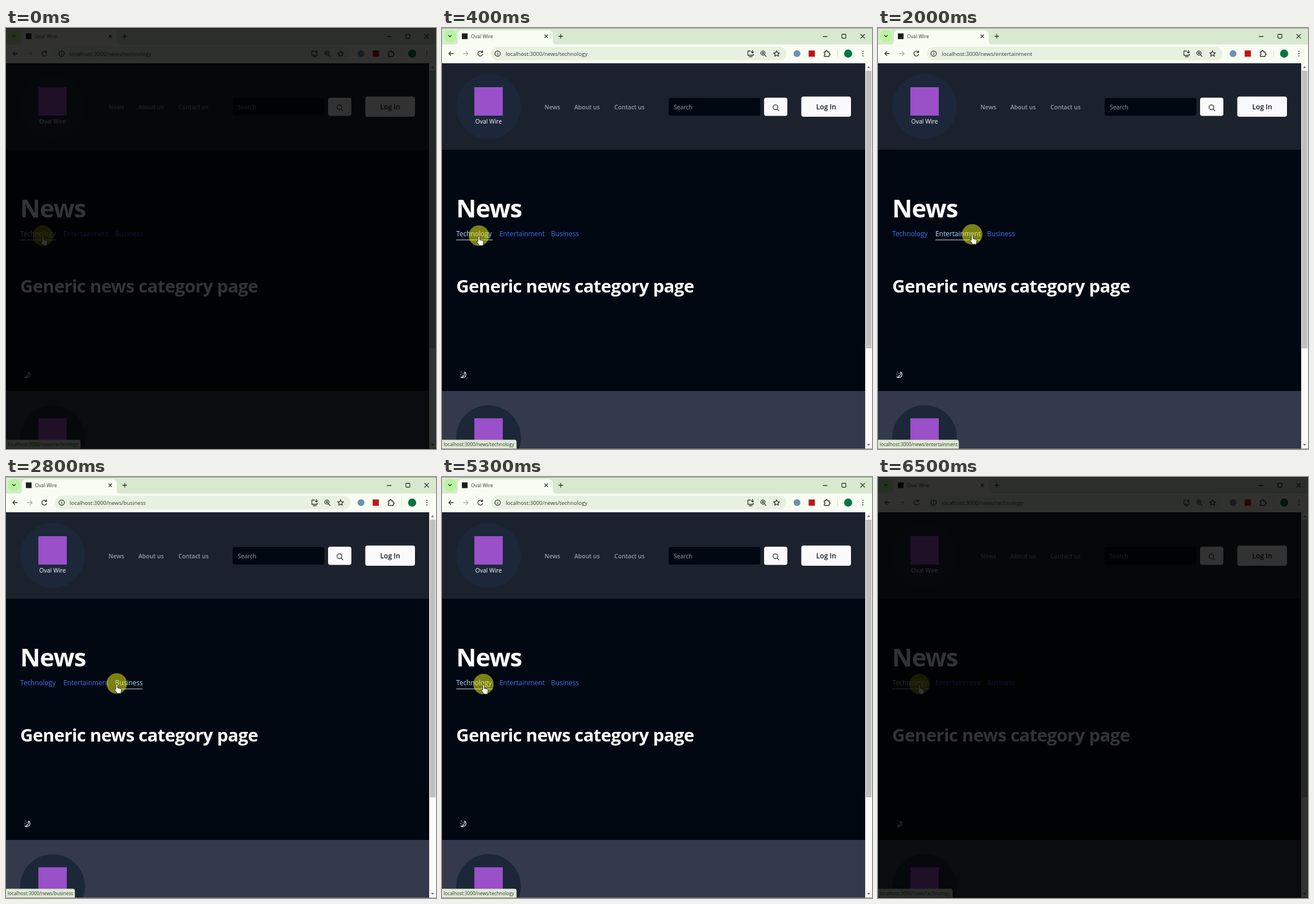
These frames come from a looping animation (757 px wide and 740 px high, 6600 ms). An HTML page:

```html
<!DOCTYPE html>
<html lang="en">
<head>
<meta charset="utf-8">
<title>News categories</title>
<style>
html, body { margin: 0; width: 100%; height: 100%; overflow: hidden; background: #000; }
svg { display: block; width: 757px; height: 740px; }
text { font-family: "Open Sans", "Noto Sans", sans-serif; white-space: pre; }
.ui { fill: #333a30; }
.ink { fill: none; stroke: #30362e; stroke-width: 1.3; stroke-linecap: round; stroke-linejoin: round; }
.head { fill: #fff; font-weight: 700; letter-spacing: -.02em; }
.nav { fill: #929cac; font-weight: 600; font-size: 10.4px; }
.link { fill: #3f72f2; font-size: 11.9px; }
.link.on { fill: #b5dcff; }
</style>
</head>
<body>
<svg viewBox="0 0 757 740">
  <defs>
    <g id="badge">
      <circle r="57" fill="#1c273a"/>
      <rect x="-25" y="-34" width="50" height="50" fill="#9a50c8"/>
      <text y="29.5" text-anchor="middle" font-size="10.5" fill="#fff">Oval Wire</text>
    </g>
  </defs>

  <!-- browser tabs -->
  <rect width="757" height="40" fill="#d9e9cf"/>
  <path d="M0 .5H757" stroke="#8d9a86"/>
  <rect x="4" y="4" width="21" height="21" rx="7" fill="#b9f3a2"/>
  <path d="M20 30q8 0 8-8V12q0-8 8-8H187q8 0 8 8v10q0 8 8 8z" fill="#f8fcf3"/>
  <rect x="35" y="9.500" width="10" height="10" fill="#1c1e1b"/>
  <text id="title" class="ui" x="51" y="18" font-size="8.700">Oval Wire</text>
  <path class="ink" d="M11.500 13l2.500 2.500 2.500-2.500M181 12l5 5m0-5l-5 5M205.500 14.500h7M209 11v7M671 15h7M737 11l7 7m0-7l-7 7"/>
  <rect class="ink" x="704" y="11" width="7" height="7" rx="1.500"/>

  <!-- toolbar -->
  <rect y="29" width="757" height="34" fill="#f8fcf3"/>
  <rect x="86" y="33" width="520" height="24" rx="12" fill="#e8f1e1"/>
  <path class="ink" d="M20 45h-8m3.500-3.500L12 45l3.500 3.500M71 42.500a4.300 4.300 0 1 0 .5 4M71.500 40v3h-3"/>
  <path class="ink" d="M38 45h8m-3.500-3.500L46 45l-3.500 3.500" style="stroke:#a9b2a3"/>
  <circle class="ink" cx="98" cy="45" r="4.700"/>
  <path class="ink" d="M98 44.700v2.500M98 42.600v.1"/>
  <text id="url" class="ui" x="112" y="48.700" font-size="9.600"></text>
  <path class="ink" d="M543 40.500h-4.500v7.500h9.500v-2M541 50.500h5M546.500 39.500v4m-2-1.500l2 2 2-2"/>
  <path class="ink" d="M567.500 47l3 3M563.500 44h3M565 42.500v3"/>
  <circle class="ink" cx="565" cy="44" r="3.700"/>
  <path class="ink" d="M589 40l1.500 3.300 3.600.4-2.700 2.400.8 3.600-3.200-1.900-3.200 1.900.8-3.600-2.700-2.400 3.600-.4z"/>
  <circle cx="625" cy="45" r="6" fill="#6f8fae"/>
  <rect x="645.500" y="39.500" width="11" height="11" fill="#bd1515"/>
  <path class="ink" d="M673 42h2.500q0-2.500 1.500-2.500t1.500 2.500h3v3q2 0 2 1.300t-2 1.400V50H673v-2.500q1.500-.3 1.500-1.500T673 44.500z"/>
  <path d="M696.500 39v12" stroke="#cfe3c2"/>
  <circle cx="715" cy="45" r="7.200" fill="#087443"/>
  <path class="ink" d="M741 41v.1M741 45v.1M741 49v.1" style="stroke-width:2"/>

  <!-- page -->
  <rect y="62" width="745" height="678" fill="#010812"/>
  <rect y="62" width="745" height="152" fill="#1b222d"/>
  <rect y="638" width="745" height="102" fill="#343a4c"/>
  <use href="#badge" x="82" y="138"/>
  <use href="#badge" x="82" y="720"/>
  <g class="nav">
    <text x="180.500" y="143">News</text>
    <text x="233" y="143">About us</text>
    <text x="303.500" y="143">Contact us</text>
  </g>
  <rect x="399" y="123" width="161.500" height="31" rx="4" fill="#010812"/>
  <text x="408" y="142.800" font-size="10.400" fill="#98a2b2">Search</text>
  <rect x="567" y="122.500" width="41" height="32" rx="4" fill="#fafafc"/>
  <path class="ink" d="M590 142.500l3 3"/>
  <circle class="ink" cx="587" cy="139.300" r="4.200"/>
  <rect x="632.500" y="120.500" width="87.500" height="35.500" rx="4" fill="#fafafc"/>
  <text x="676.300" y="143" text-anchor="middle" font-size="12" font-weight="600" fill="#10141f">Log In</text>
  <text class="head" x="25" y="332.500" font-size="43.500">News</text>
  <text class="head" x="25" y="465" font-size="31.200">Generic news category page</text>
  <g id="links"></g>
  <path id="line" stroke="#b5dcff"/>
  <path d="M40 604.800a5.200 5.200 0 1 1-6.500 8.700q6 .5 6.500-8.700z" fill="none" stroke="#e8edf5" stroke-width="1.200"/>
  <path d="M34 604.500v.1M37 607v.1M33 609.500v.1M36 610.500v.1" stroke="#e8edf5" stroke-width="1.400" stroke-linecap="round"/>

  <!-- scrollbar -->
  <rect x="745" y="62" width="12" height="678" fill="#fafbf9"/>
  <rect x="746" y="75" width="10" height="488" fill="#c0c0c0"/>
  <path d="M748 70.500l3-3.500 3 3.500zM748 731l3 3.500 3-3.500z" fill="#7d7d7d"/>

  <path id="bubble" fill="#dfead5" stroke="#bccab2" stroke-width=".7"/>
  <text id="status" class="ui" x="3" y="735" font-size="8.250"></text>
  <path d="M0 739.500H757" stroke="#768070" stroke-width=".8"/>

  <g id="cursor">
    <circle r="18" fill="#fafa14" fill-opacity=".5"/>
    <path d="M-1.500 2.500q0-1.700 1.400-1.700t1.400 1.700v5l5 1.200q2 .5 2 2.500l-1 4.500v1.800H.3v-1.300l-4-5q-.8-2 1.200-1.500l1 .9z" fill="#fff" stroke="#20231a" stroke-width=".9"/>
  </g>
  <rect id="shade" width="757" height="740"/>
</svg>
<script>
const $ = id => document.getElementById(id);
const LOOP = 6600, STEP = 100;
const tabs = [
  { name: "Technology", x: 25, end: 89, bubble: 131 },
  { name: "Entertainment", x: 101, end: 180, bubble: 142 },
  { name: "Business", x: 192, end: 240, bubble: 121 }
];
// [time, tab index]
const pages = [[0, 0], [1600, 1], [2400, 2], [3400, 1], [4200, 0]];
const hovers = [[0, 0], [1200, 1], [2100, 2], [3000, 1], [3800, 0]];
// [time, x, y]
const path = [
  [0, 65, 365], [600, 65, 365], [1300, 112, 362], [1700, 112, 362],
  [2200, 195, 363], [2800, 195, 363], [3100, 150, 363], [3400, 150, 363],
  [3900, 82, 364], [4400, 73, 364], [LOOP, 73, 364]
];

for (const tab of tabs) {
  const el = document.createElementNS("http://www.w3.org/2000/svg", "text");
  el.setAttribute("x", tab.x);
  el.setAttribute("y", 366);
  el.textContent = tab.name;
  tab.el = $("links").appendChild(el);
}

const at = (list, t) => tabs[list.findLast(k => k[0] <= t)[1]];
const address = tab => "localhost:3000/news/" + tab.name.toLowerCase();

function place(t) {
  const i = path.findIndex(k => k[0] > t);
  const [t0, x0, y0] = path[i - 1], [t1, x1, y1] = path[i];
  const u = (t - t0) / (t1 - t0), e = u * u * (3 - 2 * u);
  return [x0 + (x1 - x0) * e, y0 + (y1 - y0) * e];
}

function draw(now) {
  const t = Math.floor(now % LOOP / STEP) * STEP;
  const page = at(pages, t), hover = at(hovers, t);
  for (const tab of tabs) tab.el.setAttribute("class", tab === page ? "link on" : "link");
  $("line").setAttribute("d", `M${page.x} 372.5H${page.end}`);
  $("url").textContent = address(page);
  $("status").textContent = address(hover);
  $("bubble").setAttribute("d", `M0 724H${hover.bubble - 3}q3 0 3 3v13H0z`);
  $("cursor").setAttribute("transform", `translate(${place(t)})`);
  const light = Math.min(1, .2 + t / 500, (LOOP - t) / 500);
  $("shade").setAttribute("opacity", 1 - light);
  requestAnimationFrame(draw);
}
requestAnimationFrame(draw);
</script>
</body>
</html>
```
